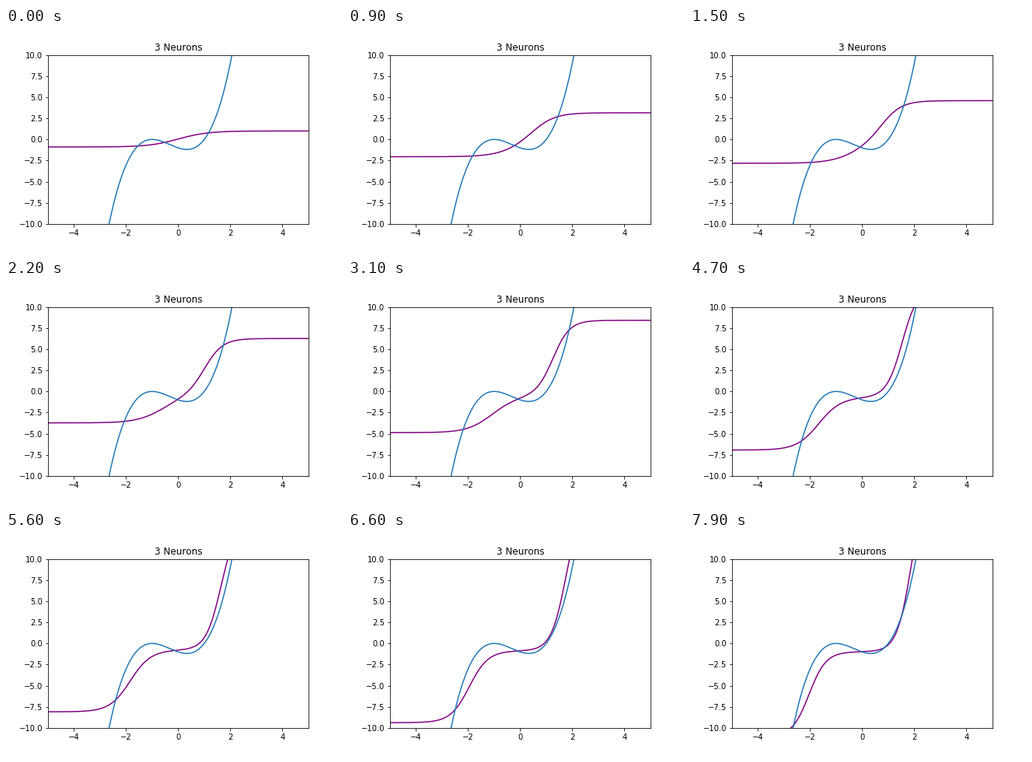
These frames come from a looping animation (432 px wide and 288 px high, 8000 ms). A matplotlib script:

```python
import numpy as np
import matplotlib.pyplot as plt
from matplotlib.animation import FuncAnimation

FRAMES, STEP = 80, 100
plt.rcParams["text.kerning_factor"] = 6


def sigmoid(z):
    return 0.5 * (1 + np.tanh(z / 2))


def fitted(x, t):
    """Learned curve after t seconds: two steps between three levels."""
    # Output weights grow at a constant rate.
    left = -0.89 - 1.285 * t
    mid = -0.27 - 0.09 * t
    right = 1 + 2.39 * t

    # The steps drift apart and steepen.
    c1 = -0.08 - 2.09 * t**3 / (t**3 + 3.2**3)
    c2 = 0.05 + 0.1 * t + 1.06 * np.tanh(t / 2.5)
    k1 = 1.75 + 0.06 * t**1.5
    k2 = 1.75 + 1.9 * (1 - np.exp(-t / 2.5))

    return (left + (mid - left) * sigmoid(k1 * (x - c1))
            + (right - mid) * sigmoid(k2 * (x - c2)))


fig, ax = plt.subplots(figsize=(6, 4), dpi=72, facecolor="white")
fig.subplots_adjust(left=0.125, right=0.9, bottom=0.125, top=0.88)

x = np.linspace(-5, 5, 400)
fit, = ax.plot(x, fitted(x, 0), color="purple", lw=1.5)
ax.plot(x, x**3 + x**2 - x - 1, color="C0", lw=1.5)

ax.set(xlim=(-5, 5), ylim=(-10, 10), title="3 Neurons",
       xticks=np.arange(-4, 5, 2), yticks=np.arange(-10, 10.1, 2.5))


def update(i):
    fit.set_ydata(fitted(x, i * STEP / 1000))
    return fit,


anim = FuncAnimation(fig, update, frames=FRAMES, interval=STEP,
                     repeat=True, repeat_delay=0)
plt.show()
```
